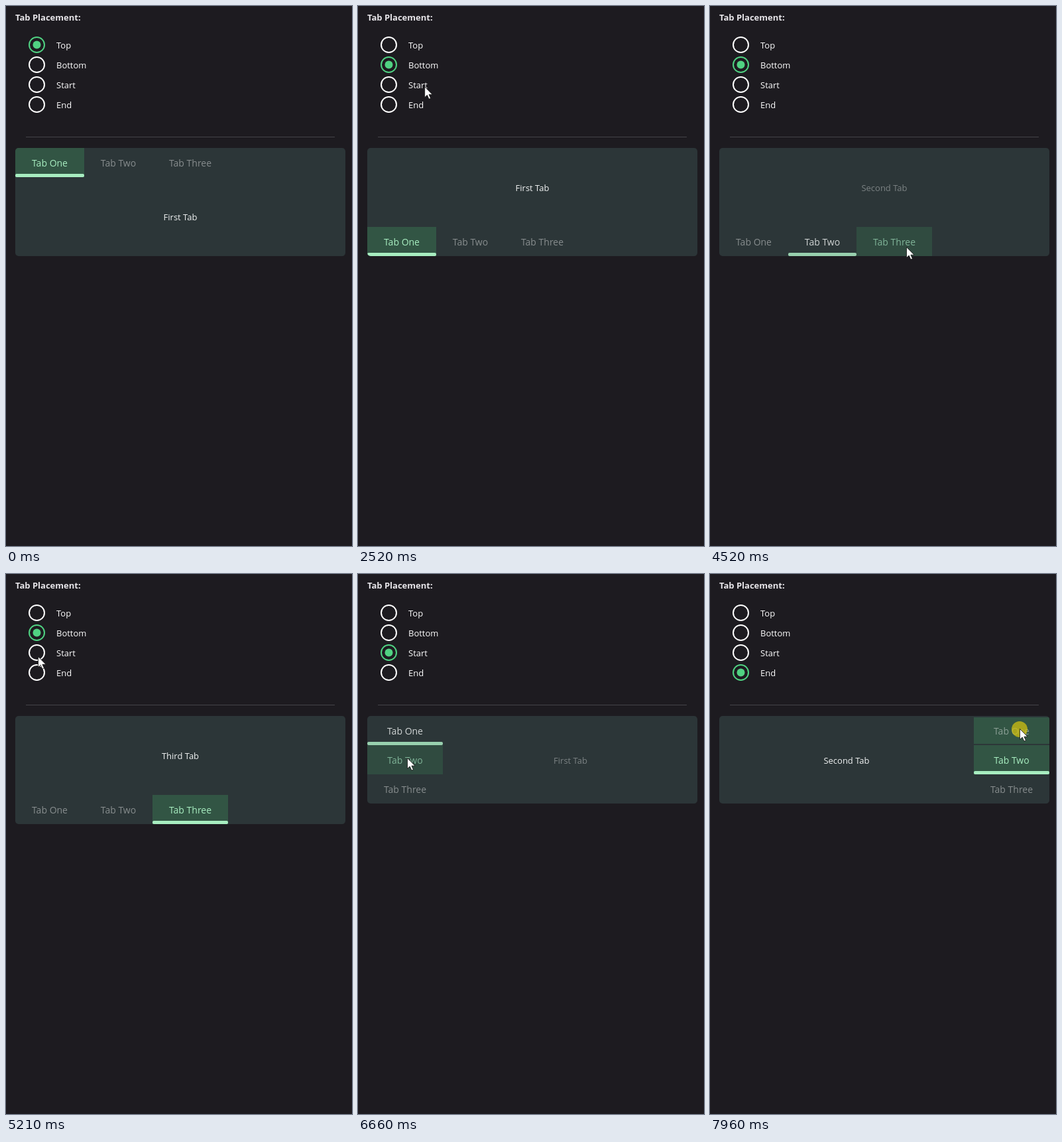
Write an HTML page that moves like this. It is 522x814 px and loops after 8 s.

```html
<!DOCTYPE html>
<html lang="en">
<head>
<meta charset="utf-8">
<title>Tab placement</title>
<style>
html, body { margin: 0; width: 100%; height: 100%; overflow: hidden; background: #1d1b20; }
svg { display: block; width: 522px; height: 814px; }
text { font: 13px "Open Sans", "Noto Sans", sans-serif; fill: #fff; }
.title { font-weight: 700; fill: #e8e6ea; }
.tab { font-size: 14px; text-anchor: middle; }
.content { text-anchor: middle; fill: #f1f3f3; }
</style>
</head>
<body>
<svg id="stage" viewBox="0 0 522 814"></svg>
<script>
const LOOP = 8000, PRESS = 140, SWITCH = 110;
const GREEN = '#50d282', MINT = '#a7edc0';
const PLACES = ['Top', 'Bottom', 'Start', 'End'];
const TABS = ['Tab One', 'Tab Two', 'Tab Three'];
const CONTENTS = ['First Tab', 'Second Tab', 'Third Tab'];
const TAB_X = [14, 118, 221], TAB_W = [104, 103, 114];

// Pointer path: time, x, y
const PATH = [
  [390, 435, 736], [1020, 109, 128], [1350, 109, 128], [1700, 48, 88],
  [1900, 48, 88], [2120, 41, 64], [2200, 44, 59], [2520, 100, 121],
  [2930, 157, 232], [3000, 157, 232], [3400, 190, 352], [3700, 217, 360],
  [3760, 234, 361], [4000, 190, 366], [4130, 190, 366], [4300, 290, 363],
  [4520, 296, 363], [4650, 296, 362], [5150, 48, 124], [5490, 48, 126],
  [5900, 91, 238], [6100, 91, 238], [6450, 74, 277], [6680, 74, 277],
  [7070, 48, 145], [7220, 48, 147], [7800, 467, 233], [8000, 467, 233]
];
// Press time, what it changes, new index
const PRESSES = [
  [1700, 'place', 1], [4000, 'tab', 1], [4320, 'tab', 2], [5230, 'place', 2],
  [6000, 'tab', 0], [6480, 'tab', 1], [7130, 'place', 3], [7930, 'tab', 0]
];

const stage = document.getElementById('stage');

function set(node, attrs) {
  for (const key in attrs) node.setAttribute(key, attrs[key]);
  return node;
}
function add(parent, tag, attrs, label) {
  const node = set(document.createElementNS('http://www.w3.org/2000/svg', tag), attrs);
  if (label) node.textContent = label;
  return parent.appendChild(node);
}

add(stage, 'text', { x: 14, y: 22, class: 'title' }, 'Tab Placement:');
const radios = PLACES.map((label, i) => {
  const cy = 58.5 + 30 * i;
  add(stage, 'text', { x: 76, y: 64 + 30 * i }, label);
  return {
    ring: add(stage, 'circle', { cx: 46.5, cy, r: 11.5, fill: 'none', 'stroke-width': 2 }),
    dot: add(stage, 'circle', { cx: 46.5, cy, r: 6, fill: GREEN })
  };
});
add(stage, 'path', { d: 'M30 197.5H496', stroke: '#454449' });

const clip = add(stage, 'clipPath', { id: 'panelClip' });
const clipRect = add(clip, 'rect', { x: 14, y: 214, width: 498, rx: 5 });
const panel = add(stage, 'g', { 'clip-path': 'url(#panelClip)' });
add(panel, 'rect', { x: 14, y: 214, width: 498, height: 163, fill: '#2c3638' });
const tabs = TABS.map(label => ({
  fill: add(panel, 'rect', { fill: '#325544' }),
  bar: add(panel, 'rect', { height: 5, rx: 2 }),
  text: add(panel, 'text', { class: 'tab' }, label)
}));
const content = add(panel, 'text', { class: 'content' });

const ripple = add(stage, 'circle', { r: 12, fill: '#d0c010', 'fill-opacity': 0.75 });
const pointer = add(stage, 'path', {
  d: 'M0 0V16L3.7 12.6 6.4 18.6 9 17.5 6.4 11.7H11.5Z',
  fill: '#fff', stroke: '#111', 'stroke-width': 0.8
});

function slope(i, axis) {
  const a = PATH[i], b = PATH[i + 1];
  return a && b ? (b[axis] - a[axis]) / (b[0] - a[0]) : 0;
}
// Harmonic tangents keep the curve smooth without overshoot.
function tangent(i, axis) {
  const a = slope(i - 1, axis), b = slope(i, axis);
  return a * b > 0 ? 2 * a * b / (a + b) : 0;
}
function pointerAt(t) {
  if (t < PATH[0][0]) return null;
  let i = 0;
  while (i < PATH.length - 2 && t >= PATH[i + 1][0]) i++;
  const span = PATH[i + 1][0] - PATH[i][0];
  const p = (t - PATH[i][0]) / span, q = 1 - p;
  return [1, 2].map(axis =>
    PATH[i][axis] * q * q * (1 + 2 * p) + PATH[i + 1][axis] * p * p * (3 - 2 * p) +
    span * p * q * (q * tangent(i, axis) - p * tangent(i + 1, axis)));
}

function tabBox(place, i) {
  if (place < 2) return { x: TAB_X[i], y: place ? 333 : 214, w: TAB_W[i] };
  return { x: place === 2 ? 14 : 398, y: 214 + 44 * i, w: 114 };
}
function isInside(box, t) {
  const p = pointerAt(t);
  return p && p[0] >= box.x && p[0] < box.x + box.w && p[1] >= box.y && p[1] < box.y + 44;
}
// Hover fades in over 200 ms and drops at once when the pointer leaves.
function hoverAmount(box, t) {
  let steps = 0;
  while (steps < 20 && isInside(box, t - steps * 10)) steps++;
  return steps / 20;
}

function stateAt(t) {
  const state = { place: 0, tab: 0, next: -1, pressed: false };
  for (const [start, kind, index] of PRESSES) {
    const age = t - start;
    if (age < 0) break;
    if (age < PRESS) state.pressed = true;
    else if (kind === 'tab' && age < PRESS + SWITCH) state.next = index;
    else state[kind] = index;
  }
  return state;
}

function drawTab(tab, i, state, t) {
  const box = tabBox(state.place, i);
  const selected = state.tab === i, switching = state.next >= 0, incoming = state.next === i;
  const lit = selected && !switching;
  const inset = lit || incoming ? 0 : 2;
  const alpha = lit ? 1 : incoming ? 0.7 : selected ? 0 : hoverAmount(box, t);
  set(tab.fill, {
    x: box.x, y: box.y + inset, width: box.w, height: 44 - 2 * inset, 'fill-opacity': alpha
  });
  set(tab.bar, {
    x: box.x, y: box.y + 39, width: box.w,
    fill: switching ? '#98d0ae' : MINT, opacity: selected ? 1 : 0
  });
  set(tab.text, { x: box.x + box.w / 2, y: box.y + 28 });
  tab.text.style.fill = lit ? MINT : incoming ? '#7fb397' : selected ? '#d0d4d4' : 'rgba(255,255,255,.43)';
}

function draw(t) {
  const state = stateAt(t), { place } = state;
  radios.forEach(({ ring, dot }, i) => {
    set(ring, { stroke: i === place ? GREEN : '#fff' });
    set(dot, { opacity: i === place ? 1 : 0 });
  });
  set(clipRect, { height: place < 2 ? 163 : 132 });
  tabs.forEach((tab, i) => drawTab(tab, i, state, t));
  content.textContent = CONTENTS[state.tab];
  set(content, {
    x: [263, 263, 320.5, 206][place], y: [323, 279, 286, 286][place],
    opacity: state.next >= 0 ? 0.4 : 1
  });

  const at = pointerAt(t);
  set(pointer, { visibility: at ? 'visible' : 'hidden' });
  set(ripple, { visibility: at && state.pressed ? 'visible' : 'hidden' });
  if (at) {
    set(pointer, { transform: `translate(${at[0] + 0.5} ${at[1] + 0.5})` });
    set(ripple, { cx: at[0], cy: at[1] + 1 });
  }
}

const begin = performance.now();
function tick() {
  draw((performance.now() - begin) % LOOP);
  requestAnimationFrame(tick);
}
tick();
</script>
</body>
</html>
```
